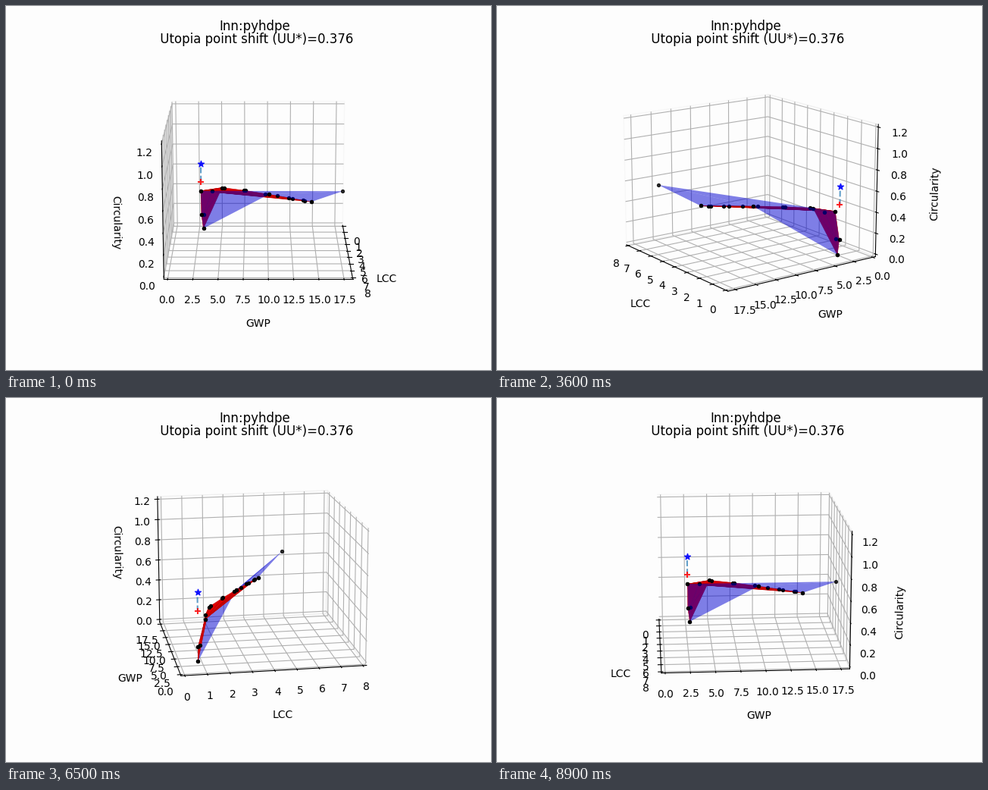
These frames come from a looping animation (640x480 px, 9 s). A matplotlib script:

```python
import matplotlib.pyplot as plt
import numpy as np
from matplotlib.animation import FuncAnimation
from mpl_toolkits.mplot3d.art3d import Poly3DCollection

FRAMES = 90
STEP = 360 / FRAMES
PAPER = "#fdfdfd"

# Points are (LCC, GWP, circularity): a few corners, then a straight
# ridge whose circularity levels off as GWP grows.
corners = [(0.785, 2.97, 0.0), (0.78, 2.77, 0.14), (0.89, 3.0, 0.15),
           (1.11, 2.75, 0.397), (1.2, 3.99, 0.4)]
gwp = np.array([5.07, 5.32, 7.46, 7.64, 9.72, 10.12,
                11.0, 12.14, 12.57, 13.67, 13.82, 14.5])
rise = gwp - gwp[0]
ridge = np.column_stack([1.44 + rise / 3.17, gwp,
                         0.474 - 0.027 * np.exp(-rise / 3.5)])
front = np.vstack([corners, ridge])
points = np.vstack([front, (5.83, 17.55, 0.65)])
LOW, LEFT, INNER, BEND, MID, END, FAR = 0, 1, 2, 3, 10, 16, 17


def utopia(pts):
    return [*pts[:, :2].min(axis=0), pts[:, 2].max()]


def fan(hub, rim):
    return [(hub, a, b) for a, b in zip(rim, rim[1:])]


blue_tris = fan(MID, [LOW, BEND, FAR, END]) + fan(BEND, [LOW, LEFT])
red_tris = (fan(INNER, [LOW, LEFT, BEND, 4, 5, LOW])
            + fan(BEND, range(4, END + 1)))

fig = plt.figure(figsize=(6.4, 4.8), dpi=100, facecolor=PAPER)
ax = fig.add_subplot(projection="3d", computed_zorder=False, facecolor=PAPER)
# 3D axes scale the title height by 0.92.
ax.set_title("Inn:pyhdpe\n Utopia point shift (UU*)=0.376",
             y=1 / 0.92, linespacing=0.95)


def surface(tris, color, zorder, edge="none", width=0):
    mesh = Poly3DCollection(points[np.array(tris)], facecolors=color,
                            edgecolors=edge, linewidths=width, zorder=zorder)
    ax.add_collection3d(mesh)
    return mesh


def dots(xyz, color="black", size=8, marker="o", **kw):
    ax.scatter(*np.atleast_2d(xyz).T, color=color, s=size, marker=marker,
               depthshade=False, **kw)


blue = surface(blue_tris, (0, 0, 0.82, 0.5), 1)
surface(red_tris, (0.88, 0, 0, 1), 2, (0.75, 0, 0, 1), 0.4)
dots(front, zorder=3)
dots(points[[LOW, LEFT, BEND, MID, END]], zorder=4)
dots(points[FAR], alpha=0.8, zorder=4)

old, new = utopia(front), utopia(points)
ax.plot(*zip(old, new), "--", color="C0", alpha=0.7, zorder=2.5)
dots(old, "red", 36, "+", alpha=0.85, zorder=5)
dots(new, "blue", 36, "*", alpha=0.85, zorder=5)


def setup(axis, set_lim, name, top, ticks):
    pad = top / 48
    set_lim(-pad, top + pad)
    axis.set_ticks(ticks)
    axis.set_label_text(name)
    axis.labelpad = 10
    axis.pane.fill = False


setup(ax.xaxis, ax.set_xlim, "LCC", 8, np.arange(9))
setup(ax.yaxis, ax.set_ylim, "GWP", 18, np.arange(0, 18, 2.5))
setup(ax.zaxis, ax.set_zlim, "Circularity", 1.2, np.linspace(0, 1.2, 7))


def update(i):
    azim = i * STEP
    # Lean a hair towards +y so edge-on walls resolve the same way.
    ax.view_init(15, azim + 1e-6 * np.cos(np.radians(azim)))
    # The blue sheet covers the rest while its far corner is nearest.
    nearest = np.cos(np.radians(azim - 54.3)) > -0.04
    blue.set_zorder(3.5 if nearest else 1)
    return []


anim = FuncAnimation(fig, update, frames=FRAMES, interval=100, repeat=True,
                     repeat_delay=0, init_func=lambda: update(0))
plt.show()
```
